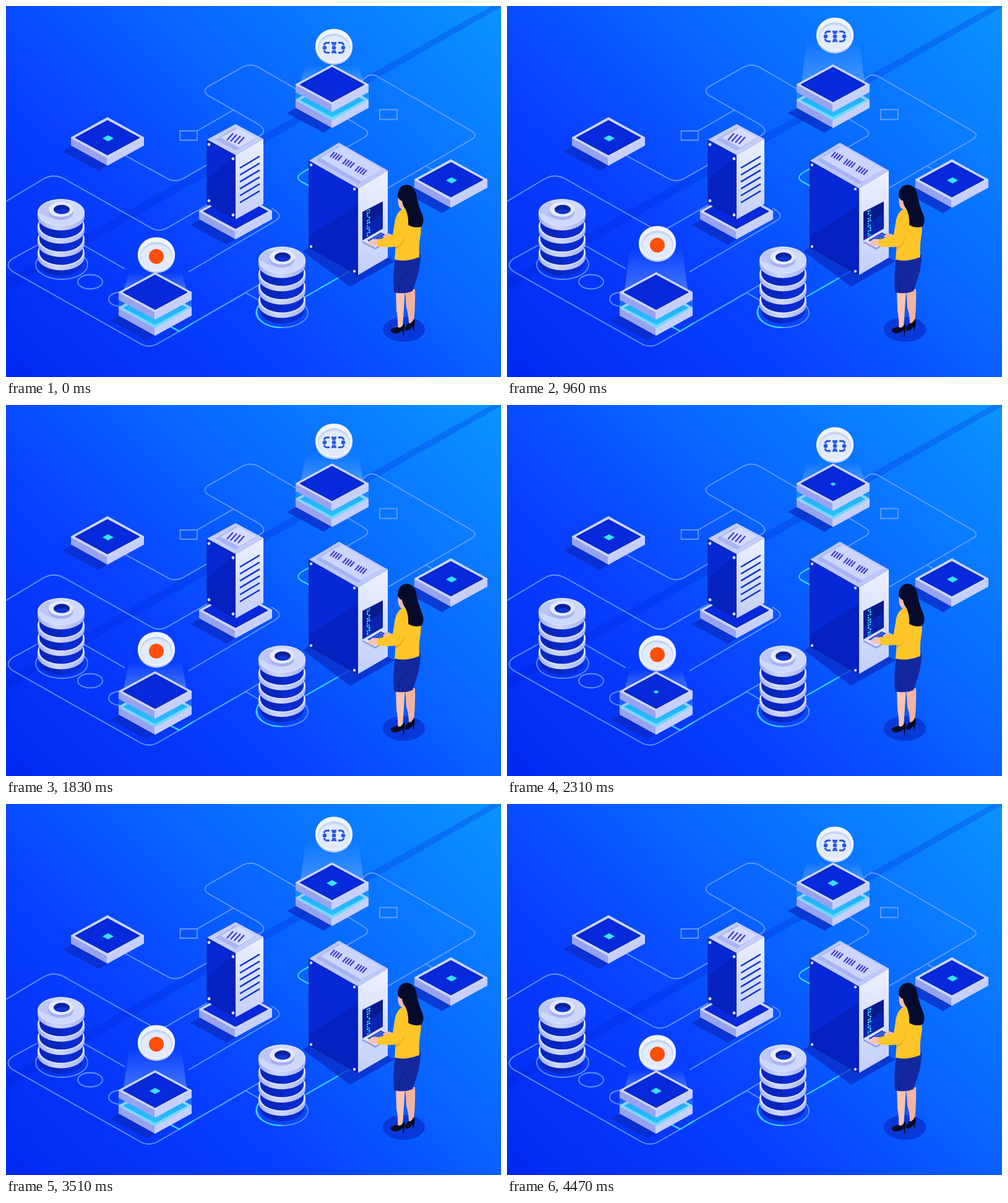
Write an HTML page that moves like this. It is 800 by 600 pixels and loops after 4.5 s.

```html
<!DOCTYPE html>
<html lang="en">
<head>
<meta charset="utf-8">
<title>Connected servers</title>
<style>
  html, body { margin: 0; width: 100%; height: 100%; overflow: hidden; background: #0050ff; }
  svg { display: block; width: 800px; height: 600px; }
  .wire { fill: none; stroke: #79a7ff; stroke-opacity: .82; stroke-width: 1.8; }
  .glow { fill: none; stroke: #35dcff; stroke-width: 2; }
  .shade { fill: #0a2bc4; fill-opacity: .75; }
  .slats { fill: none; stroke: #4038d4; stroke-width: 2.3; }
  .bolt { fill: #d5ddff; }
  .round { stroke-linejoin: round; stroke-width: 2; }
</style>
</head>
<body>
<svg viewBox="0 0 800 600">
  <defs>
    <linearGradient id="sky" gradientUnits="userSpaceOnUse" x1="0" y1="600" x2="700" y2="-100">
      <stop stop-color="#0028f0"/><stop offset=".35" stop-color="#0840ff"/>
      <stop offset=".57" stop-color="#0860ff"/><stop offset="1" stop-color="#0a94ff"/>
    </linearGradient>
    <linearGradient id="band">
      <stop stop-color="#0024d8" stop-opacity=".4"/><stop offset=".6" stop-color="#0038e4" stop-opacity=".36"/>
      <stop offset="1" stop-color="#0a5cf0" stop-opacity=".5"/>
    </linearGradient>
    <linearGradient id="pale" x2="0" y2="1">
      <stop stop-color="#edf2ff"/><stop offset="1" stop-color="#c3cefb"/>
    </linearGradient>
    <linearGradient id="rim">
      <stop stop-color="#a3aef2"/><stop offset=".4" stop-color="#d0d8fd"/><stop offset="1" stop-color="#a9b3f2"/>
    </linearGradient>
    <linearGradient id="ray" x2="0" y2="1">
      <stop stop-color="#8fc0ff" stop-opacity="0"/><stop offset="1" stop-color="#8fc0ff" stop-opacity=".42"/>
    </linearGradient>
    <linearGradient id="haze" x2="0" y2="1">
      <stop stop-color="#30c8ff" stop-opacity=".25"/><stop offset="1" stop-color="#3cd6ff" stop-opacity=".65"/>
    </linearGradient>
    <clipPath id="screen"><path d="M577 334 608 318V359L577 377Z"/></clipPath>

    <path id="mark" d="M0-5 9 0 0 5-9 0Z" fill="#35e4f5"/>

    <g id="slab" class="round">
      <path d="M-58 0 0 32V44L-58 12Z" fill="#98a3f0" stroke="#98a3f0"/>
      <path d="M58 0 0 32V44L58 12Z" fill="#c6cffb" stroke="#c6cffb"/>
      <path d="M0-32 58 0 0 32-58 0Z" fill="#cbd5ff" stroke="#cbd5ff"/>
    </g>
    <path id="drop" class="shade" d="M-73 22-44 6 8 40-14 54Z"/>
    <g id="tile">
      <use href="#drop"/><use href="#slab"/>
      <path d="M0-28 52 0 0 28-52 0Z" fill="#0629dc" stroke="#0a1fa8"/>
    </g>
    <g id="dock">
      <use href="#drop" y="24"/>
      <use href="#slab" y="25"/>
      <path d="M0-3 52 25 0 53-52 25Z" fill="#18a0f8"/>
      <path d="M-59 8 0 41 59 8V25L0 58-59 25Z" fill="url(#haze)"/>
      <path d="M-52 26 0 54 52 26" fill="none" stroke="#5fe8ff"/>
      <path class="beam" d="M-51-4-42-76H42L51-4Z" fill="url(#ray)"/>
      <g transform="scale(1 .98)"><use href="#slab"/></g>
      <path d="M0-28 52 0 0 28-52 0Z" fill="#0629dc" stroke="#0a1fa8"/>
      <g class="pop"><use href="#mark"/></g>
    </g>
    <g id="coin">
      <ellipse cy="1" rx="30" ry="28" fill="#c5d2f8"/>
      <ellipse cy="-1.5" rx="30" ry="27.5" fill="#f1f5ff"/>
      <ellipse cy="1" rx="26" ry="22.5" fill="#c8d6f5"/>
      <ellipse cy="3" rx="24.5" ry="20.5" fill="#e2ebfd"/>
    </g>
    <g id="disc">
      <path d="M-38 0V7A38 22 0 0 0 38 7V0Z" fill="url(#rim)"/>
      <ellipse rx="38" ry="22" fill="#dbe2ff"/>
    </g>
    <g id="core">
      <path d="M-35-16V0A35 20 0 0 0 35 0V-16Z" fill="#0726bd"/>
      <path d="M0-16V20A35 20 0 0 0 35 0V-16Z" fill="#0a2fdc" opacity=".65"/>
    </g>
    <g id="stack">
      <use href="#core" y="82"/>
      <use href="#disc" y="64.5"/><use href="#core" y="64.5"/>
      <use href="#disc" y="43"/><use href="#core" y="43"/>
      <use href="#disc" y="21.5"/><use href="#core" y="21.5"/>
      <use href="#disc"/>
      <ellipse rx="36.5" ry="20.5" fill="#cfd8fd"/>
      <path d="M-36 0A36 20 0 0 1-24-15L0-16V8L-18 9Z" fill="#b4bff5" opacity=".75"/>
      <path d="M-20-5V0A20 12 0 0 0 20 0V-5Z" fill="#a4b0f1"/>
      <ellipse cy="-5" rx="20" ry="12" fill="#e4eaff"/>
      <ellipse cx="1" cy="-5" rx="13" ry="7.5" fill="#0a229f"/>
      <path d="M-10-2A13 7.5 0 0 0 13-3Q1-9-10-2Z" fill="#0834d4"/>
    </g>
    <path id="vent" class="slats" d="M-10 2-3-6M-6 4 1-4M-2 6 5-2M2 8 9 0"/>
  </defs>

  <rect width="800" height="600" fill="url(#sky)"/>
  <path d="M0 442 785 0H800V2L0 460Z" fill="url(#band)"/>

  <g class="wire">
    <path d="M193 242 259 278Q273 287 288 278L330 254"/>
    <path d="M470 135 408 99Q395 92 382 99L327 130Q316 137 327 145L406 190Q426 202 408 211M368 168 309 202"/>
    <path d="M281.5 202H309V217H281.5ZM604 167.5H632V183.5H604Z"/>
    <path d="M574 122 582 115Q591 108 602 115L752 202Q764 209 752 216L618 294M679 259 692 266"/>
    <path d="M550 181 578 198Q591 206 578 213L490 263"/>
    <path d="M0 316 60 280Q77 270 95 280L233 358Q247 367 262 358L325 322"/>
    <path d="M50 387 10 409Q-3 419 10 429L215 545Q231 555 247 545L280 526M122 385 192 425"/>
    <path d="M429 327Q450 338 436 347L295 430M388 464 412 478M303 512 426 441"/>
    <ellipse cx="136" cy="446" rx="20" ry="11.5"/>
    <path d="M190 463C158 461 158 487 190 486"/>
    <ellipse cx="90" cy="418" rx="42" ry="24"/>
    <ellipse cx="446" cy="496" rx="42" ry="24"/>
  </g>
  <g class="glow">
    <path d="M490 263 479 269Q465 278 479 285L490 291"/>
    <path d="M265 518 280 526 388 464" stroke-opacity=".35"/>
    <path d="M265 518 280 526 303 512M484 470 566 423"/>
    <path d="M408 484C399 499 412 520 446 520"/>
  </g>

  <use href="#tile" x="164" y="213"/><use href="#mark" x="165" y="214"/>
  <use href="#tile" x="719" y="281"/><use href="#mark" x="720" y="282"/>
  <use href="#tile" x="371" y="332"/>
  <use href="#stack" x="89" y="334"/>
  <use href="#stack" x="446" y="411"/>

  <!-- small server -->
  <path d="M325 216 371 241V345L325 319Z" fill="#0728d2"/>
  <path d="M325 280 371 241V345L325 319Z" fill="#041db2" opacity=".55"/>
  <path d="M325 217 371 242V345M325 217V319L371 345" fill="none" stroke="#0b1f9c"/>
  <path d="M371 241 416 215V320L371 345Z" fill="url(#pale)"/>
  <path d="M371 191 416 215 371 241 325 216Z" fill="#c5cefb"/>
  <path d="M371 196 404 214 371 234 338 216Z" fill="#a9b5f3"/>
  <path d="M375 197 404 213 377 229 347 213Z" fill="#d3dcff"/>
  <path class="slats" d="M357 217 367 206M363 219 373 208M369 221 379 210M375 223 385 212"/>
  <path id="grille" d="M378 262 410 243" stroke="#0b31d4" stroke-width="2.4"/>
  <use href="#grille" y="11.2"/><use href="#grille" y="22.4"/><use href="#grille" y="33.6"/>
  <use href="#grille" y="44.8"/><use href="#grille" y="56"/>
  <g class="bolt">
    <circle cx="328" cy="224" r="2.4"/><circle cx="367" cy="247" r="2.4"/>
    <circle cx="328" cy="315" r="2.4"/><circle cx="367" cy="338" r="2.4"/>
  </g>

  <!-- large server -->
  <path class="shade" d="M480 397 490 390 569 435 617 407 628 413 556 454Z"/>
  <path d="M490 250 569 295V435L490 390Z" fill="#0728d6"/>
  <path d="M490 390V372L569 321V435Z" fill="#041db6" opacity=".6"/>
  <path d="M490 250V390L569 435" fill="none" stroke="#0b1f9c" stroke-width="1.5"/>
  <path d="M569 295 617 266V407L569 435Z" fill="url(#pale)"/>
  <path d="M538 221 617 266 569 295 490 250Z" fill="#bfc8fa"/>
  <path d="M538 226 606 265 569 288 500 249Z" fill="#a7b3f3"/>
  <path d="M542 226 608 264 574 284 508 246Z" fill="#ccd5fd"/>
  <use href="#vent" x="534" y="242"/><use href="#vent" x="554" y="253.5"/><use href="#vent" x="574" y="265"/>
  <g class="bolt">
    <circle cx="493" cy="257" r="2.2"/><circle cx="563" cy="296" r="2.2"/>
    <circle cx="493" cy="389" r="2.2"/><circle cx="563" cy="429" r="2.2"/>
  </g>
  <path d="M576 333 609 316V360L576 379Z" fill="#07198f"/>
  <path d="M587 351 609 334V360L576 379V360Z" fill="#0a2fd0" opacity=".5"/>
  <g clip-path="url(#screen)"><g id="code" stroke="#35e4f5" stroke-width="2.6"></g></g>
  <path d="M576 380 606 362 626 373V376L597 394 576 383Z" fill="#8f9cf0"/>
  <path d="M576 380 606 362 626 373 597 391Z" fill="#dbe3ff"/>
  <path d="M584 379 606 366 616 371 594 385Z" fill="#2949d4"/>
  <path d="M587 381 609 368M591 383 613 370" stroke="#aebcff" stroke-dasharray="2 1.5"/>

  <!-- woman -->
  <ellipse cx="643" cy="523" rx="34" ry="20" fill="#0838d8"/>
  <path d="M630 458H645L643 490Q642 506 641 520L633 524Q634 508 631 492Z" fill="#f8c3b0"/>
  <path d="M645 458H661Q662 484 659 512L651 515Q651 500 647 488Z" fill="#f3b39f"/>
  <path d="M622 523Q628 519 633 519 638 523 643 513 646 519 644 521L643 534H642L641 524Q635 531 625 529Q621 526 622 523Z" fill="#080b25"/>
  <path d="M645 521Q649 512 652 513 656 513 659 506 662 511 660 516L659 525H658L657 518Q654 524 648 525 644 525 645 521Z" fill="#080b25"/>
  <path d="M629 407 670 402Q670 422 664 440L657 461Q643 467 627 463Q625 435 629 407Z" fill="#13289f"/>
  <path d="M652 430Q638 433 634 462" fill="none" stroke="#0a1b7c"/>
  <g id="farArm">
    <path d="M627 371 616 367 609 372 612 377 627 379Z" fill="#f5b7a0"/>
  </g>
  <path d="M634 308Q632 323 638 328L647 331 652 310Z" fill="#f6b9a4"/>
  <path d="M641 328Q632 333 629 345L625 370 630 384 628 410Q645 415 668 406 667 390 669 376 673 357 668 343 660 330 641 328Z" fill="#ffc629"/>
  <path d="M629 386Q640 388 645 370 643 387 630 394Z" fill="#f0a91c"/>
  <g id="nearArm">
    <path d="M602 377 592 377 585 382 589 388 603 388Z" fill="#f8c3b0"/>
    <path d="M600 378 623 372Q631 364 632 350L645 352Q646 374 637 386 631 392 601 389Z" fill="#ffc629"/>
  </g>
  <path d="M633 308Q633 290 648 289 660 290 663 305 666 322 673 338 677 350 671 357 660 360 650 354 651 341 646 329 641 323 640 315Q636 315 633 308Z" fill="#070b2b"/>

  <use href="#dock" x="527" y="127"/>
  <use href="#dock" x="241" y="463"/>
  <g class="coin" data-x="530" data-y="66">
    <use href="#coin"/>
    <g transform="translate(0 1.5)" fill="none" stroke="#2457e4" stroke-width="3">
      <path d="M-16-4Q-15-8-11-8H-7M-4-8Q1-8 2-4M-16 4Q-15 8-11 8H-7M-4 8Q1 8 2 4M-2-4Q-1-8 4-8M7-8H11Q15-8 16-4M-2 4Q-1 8 4 8M7 8H11Q15 8 16 4"/>
      <g fill="#2457e4" stroke="none">
        <circle cx="-15" r="3.3"/><circle r="3.3"/><circle cx="15" r="3.3"/>
      </g>
    </g>
  </g>
  <g class="coin" data-x="243" data-y="403">
    <use href="#coin"/>
    <circle cy="2" r="12" fill="#ff4f0a"/>
  </g>
</svg>
<script>
const LOOP = 4500, STEP = 30, BOB = 2250, PEAK = 1050, BEAT = 900;
const $ = id => document.getElementById(id);
const all = name => [...document.querySelectorAll("." + name)];
const coins = all("coin"), beams = all("beam"), pops = all("pop");
const move = (el, x, y) => el.setAttribute("transform", `translate(${x} ${y})`);

// Two columns of code lines whose pattern repeats every 48 px.
const ROW = 4, ROWS = 12;
let lines = "";
for (let i = 0; i < ROWS * 2; i++) {
  const y = 330 + i * ROW, k = i % ROWS;
  if (k % 5 !== 3) lines += `M583 ${y + 1.5}h${k % 3 ? 2.3 : 1.6}`;
  if (k % 4 !== 2) lines += `M586 ${y}h${k % 3 === 1 ? 1.6 : 2.6}`;
}
$("code").innerHTML = `<path d="${lines}"/>`;

function draw(t) {
  const bob = t % BOB, beat = t % BEAT;
  const lift = bob < PEAK ? bob / PEAK : (BOB - bob) / (BOB - PEAK);
  for (const c of coins) move(c, c.dataset.x, c.dataset.y - 20 * lift);

  const height = .4 + .6 * lift;
  for (const b of beams) b.setAttribute("transform", `translate(0 ${-4 + 4 * height}) scale(1 ${height})`);

  const grow = Math.min(1, Math.max(0, (beat - 450) / 270));
  const size = 1 - (1 - grow) ** 3;
  for (const p of pops) p.setAttribute("transform", `translate(0 1) scale(${size})`);

  const reach = (1 - Math.cos(beat / BEAT * 2 * Math.PI)) / 2;
  move($("nearArm"), 2.5 * reach, -1.5 * reach);
  move($("farArm"), -1.5 * reach, reach);
  move($("code"), 0, -ROW * ROWS * beat / BEAT);
}

const start = performance.now();
function tick() {
  const t = Math.floor((performance.now() - start) / STEP) * STEP;
  draw(t % LOOP);
  requestAnimationFrame(tick);
}
tick();
</script>
</body>
</html>
```
